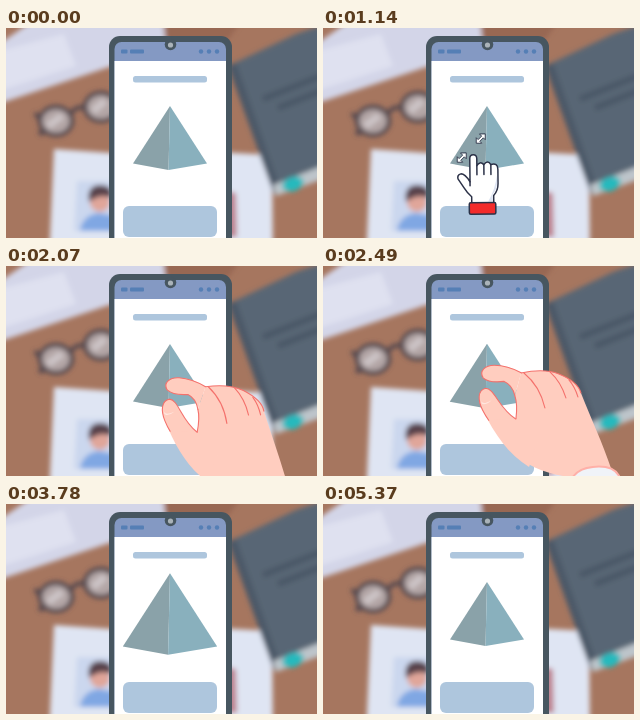
Recreate the animation shown at these times as an HTML page. Size 311 px wide and 210 px high, loop 5400 ms.

```html
<!DOCTYPE html>
<html lang="en">
<head>
<meta charset="utf-8">
<title>Pinch to zoom</title>
<style>
  html, body { margin: 0; width: 100%; height: 100%; overflow: hidden; }
  svg { display: block; width: 100%; height: 100%; }
</style>
</head>
<body>
<svg viewBox="0 0 311 210" preserveAspectRatio="none">
  <defs>
    <filter id="blur" filterUnits="userSpaceOnUse" x="-20" y="-20" width="351" height="250">
      <feGaussianBlur stdDeviation="2.4"/>
    </filter>
    <path id="arrow" d="M4.5-4.5V1L2.6-.9-.9 2.6 1 4.5H-4.5V-1L-2.6.9.9-2.6-1-4.5Z"/>
  </defs>

  <!-- desk -->
  <rect width="311" height="210" fill="#a6765f"/>
  <g filter="url(#blur)">
    <path d="M158-20H245L222 12H160Z" fill="#986753"/>
    <path d="M-20 25 22-4 30-20H156L160 20-20 80Z" fill="#d3d5e8"/>
    <path d="M-10 24 58 6 70 38-10 64Z" fill="#dfe1f0"/>
    <g fill="#b3a6a6" stroke="#554850" stroke-width="4.500">
      <ellipse cx="50" cy="93" rx="16" ry="14"/>
      <ellipse cx="95" cy="79" rx="16" ry="14"/>
      <path d="M65 85Q71 77 80 80M34 91 29 85M33 103 37 107" fill="none"/>
    </g>
    <path d="M42 98 56 88M87 83 99 73" stroke="#cdc5c7" stroke-width="7"/>
    <path d="M48 121 120 126V230H43Z" fill="#dfe5f3"/>
    <path d="M71 153H115V203H68Z" fill="#cbd7ee"/>
    <path d="M74 203Q76 188 92 185L115 189V203Z" fill="#80a7e3"/>
    <circle cx="94" cy="174" r="10" fill="#e0a69a"/>
    <path d="M83 174Q80 157 95 157 108 158 106 170Q94 165 83 174Z" fill="#59434b"/>
    <path d="M210 124 266 127 267 230H210Z" fill="#dfe5f3"/>
    <path d="M220 163 230 165 231 209H220Z" fill="#bd8290"/>
    <path d="M222 38 290 6 331-8V142L268 166Z" fill="#586675"/>
    <path d="M222 38 230 35 274 160 268 166Z" fill="#4c5968"/>
    <path d="M257 71 325 44M272 80 325 59" stroke="#4a5766" stroke-width="6"/>
    <path d="M267 157 331 132V146L270 168Z" fill="#bdc5ca"/>
    <ellipse cx="287" cy="156" rx="11" ry="7" fill="#25b9bd" transform="rotate(-18 287 156)"/>
  </g>

  <!-- phone -->
  <rect x="103" y="8" width="123" height="230" rx="11" fill="#475660"/>
  <rect x="108.500" y="14" width="111.500" height="230" rx="7" fill="#8499c3"/>
  <path d="M108.500 33H220V230H108.500Z" fill="#fff"/>
  <circle cx="164.500" cy="16.500" r="5.800" fill="#475660"/>
  <circle cx="164.500" cy="17" r="2.600" fill="#aab3b9"/>
  <g fill="#557fb5">
    <rect x="115" y="21.500" width="6.500" height="4" rx="1"/>
    <rect x="124" y="21.500" width="14" height="4" rx="1"/>
    <circle cx="195" cy="23.500" r="2.200"/>
    <circle cx="203" cy="23.500" r="2.200"/>
    <circle cx="211" cy="23.500" r="2.200"/>
  </g>
  <rect x="127" y="48" width="74" height="6.500" rx="2.500" fill="#aec6dd"/>
  <rect x="117" y="178" width="94" height="31" rx="6" fill="#aec6dd"/>

  <g id="pyramid">
    <path d="M164 78 127 135.500 162.500 142Z" fill="#8aa2a9"/>
    <path d="M164 78 201 135.500 162.500 142Z" fill="#89b0bd"/>
  </g>

  <!-- glove cursor -->
  <g id="pointer" stroke="#2b3147" stroke-linejoin="round" stroke-linecap="round">
    <g fill="#fff" stroke-width=".9">
      <use href="#arrow" x="158" y="111"/>
      <use href="#arrow" x="139" y="130"/>
    </g>
    <g id="glove" stroke-width="1.500">
      <path fill="#fff" d="M147 154V131Q147 127 150.500 127T154 131V138Q157 133 161 137 165 132 168 137 175 135 175 142V156Q175 163 170.500 168V176H148.500V169Q144 165 141 160L135 151Q134 147 138 146 142 146 147 154Z"/>
      <path fill="none" d="M154 138V147M161 137V147M168 137V147M147 154V158"/>
      <path stroke="none" fill="#dce3f2" d="M174 148V156Q173 163 169.500 167V174H165Q172 162 174 148Z"/>
      <rect x="146" y="175" width="26.500" height="11.500" rx="1.500" fill="#f32b2b"/>
    </g>
  </g>

  <!-- pinching hand: palm, index finger, thumb, sleeve -->
  <g id="hand" fill="#ffcdbf" stroke="#f4716c" stroke-width="1.100" stroke-linecap="round" stroke-linejoin="round">
    <path stroke="none" d="M193 153C194 145 194 136 192 130L198 107C212 104 226 104 236 108 248 113 256 119 258 127 268 152 280 178 288 202L310 290H270L246 211C224 208 203 200 190 186Z"/>
    <path fill="none" d="M193 153C194 145 194 136 192 130M198 107C212 104 226 104 236 108 248 113 256 119 258 127"/>
    <path id="index" d="M192 130C190 122 186 118 181 116 174 117 165 117 160 113 155 106 162 100 171 100 182 100 190 103 198 107"/>
    <path fill="none" d="M201 107Q217 120 222 142M227 106Q238 116 243 132M246 114Q252 121 255 131"/>
    <g id="thumb">
      <path stroke="none" d="M206 201C185 188 172 168 160 144L193 153 215 175Z"/>
      <path d="M166 154Q163 150 160 144C155 134 155 124 163 122 172 122 176 142 193 153"/>
      <path stroke="none" fill="#ffe6df" d="M159 135Q160 139 169 134 165 138 161 138 158 138 159 135Z"/>
    </g>
    <path d="M246 228Q247 204 270 202 289 200 295 210L345 320H285Z" fill="#f0f3f8" stroke="#ffb0a8" stroke-width="4" paint-order="stroke"/>
  </g>
</svg>

<script>
const LOOP = 5400;
const el = id => document.getElementById(id);
const transform = (id, value) => el(id).setAttribute("transform", value);
const progress = (t, from, to) => Math.min(1, Math.max(0, (t - from) / (to - from)));
const easeOut = p => 1 - (1 - p) ** 3;
const easeInOut = p => (1 - Math.cos(Math.PI * p)) / 2;
const easeInOutQuart = p => p < .5 ? 8 * p ** 4 : 1 - 8 * (1 - p) ** 4;

function show(id, visible) {
  el(id).style.display = visible ? "" : "none";
}

function drawPointer(t) {
  show("pointer", t > 270 && t < 1680);
  const offset = 1 - easeOut(progress(t, 840, 1410));
  const leave = progress(t, 1410, 1680);
  el("pointer").setAttribute("opacity", progress(t, 270, 840) * (1 - leave));
  transform("pointer", `translate(${7 * offset - 1} ${4 * offset - .7 + 19 * leave})`);
  transform("glove", `rotate(${-6 * offset} 150 128)`);
}

function drawHand(t, spread) {
  show("hand", t > 1860 && t < 3780);
  // The hand swings in past its resting place, then later drops out.
  const enter = progress(t, 1860, 2430);
  const swing = (1 - enter) * Math.cos(4 / 3 * Math.PI * enter);
  const rise = (1 - enter) ** 4;
  const drop = 133 * easeInOutQuart(progress(t, 3190, 3780));
  const x = 130 * swing - 3 * spread;
  const y = 45 * swing + 65 * rise - 2 * spread + drop;
  transform("hand", `translate(${x} ${y}) rotate(${25 * (swing + rise)} 158 107)`);
  transform("index", `translate(215 115) rotate(${37 * spread})
    scale(${1 - .26 * spread} 1) translate(-215 -115)`);
  transform("thumb", `rotate(${-16 * spread} 205 180)`);
}

function draw(t) {
  const spread = easeInOut(progress(t, 2430, 3030));
  const shrink = easeInOut(progress(t, 4920, 5370));
  const scale = 1 + .275 * (spread - shrink);
  transform("pyramid", `translate(164 110) scale(${scale}) translate(-164 -110)`);
  drawPointer(t);
  drawHand(t, spread);
}

const start = performance.now();
function frame() {
  draw((performance.now() - start) % LOOP);
  requestAnimationFrame(frame);
}
frame();
</script>
</body>
</html>
```
